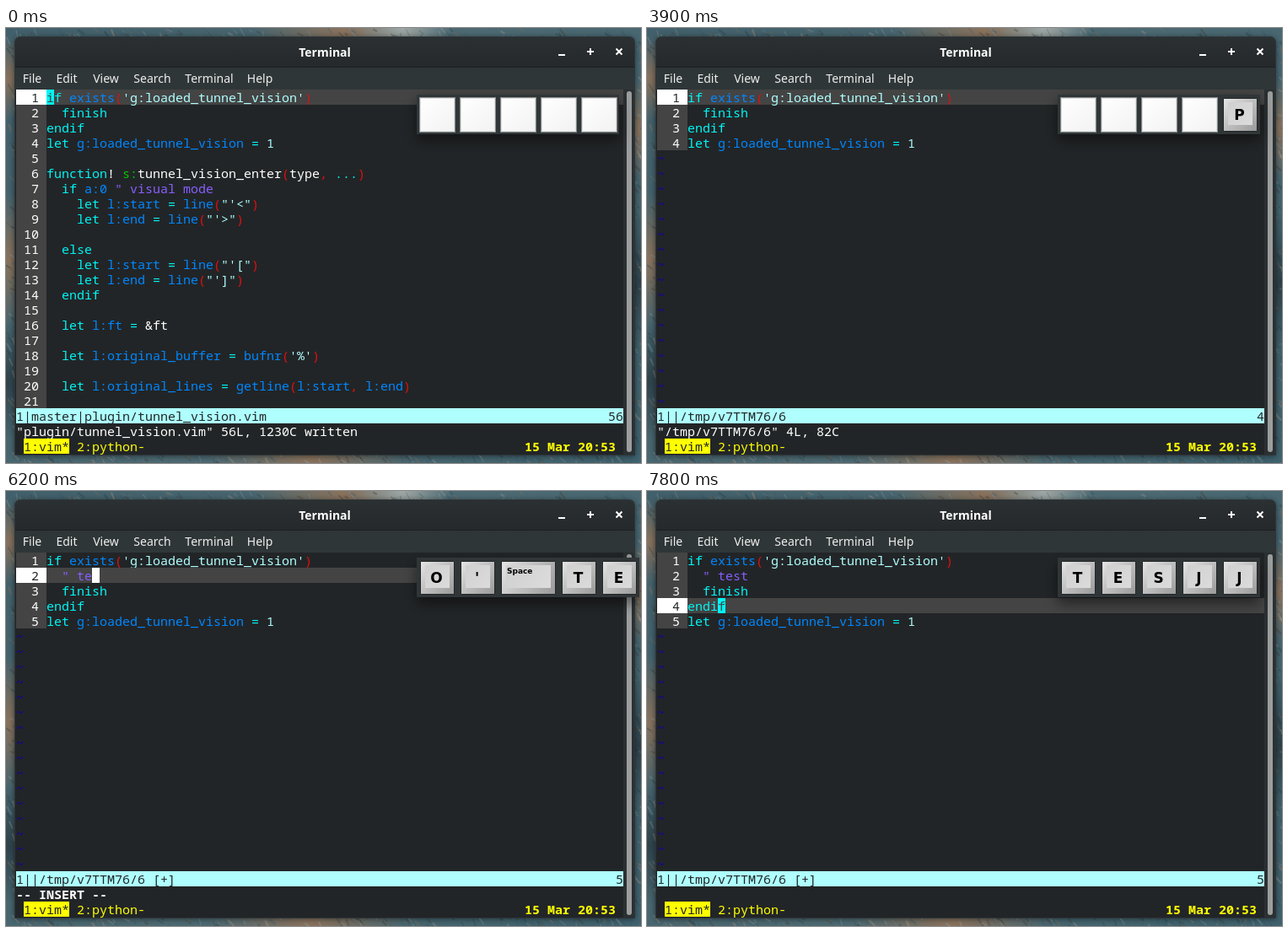
An HTML page with a canvas for the animation above (8 s loop, 753 by 516 pixels).

```html
<!DOCTYPE html>
<html lang="en">
<head>
<meta charset="utf-8">
<title>Terminal</title>
<style>
html, body { margin: 0; width: 100%; height: 100%; overflow: hidden; background: #3b4a50; }
canvas { display: block; }
</style>
</head>
<body>
<canvas id="stage" width="753" height="516"></canvas>
<script>
const canvas = document.getElementById('stage');
const LOOP = 8000, W = 753, H = 516;
const LEFT = 12, TOP = 73, CELL = 9, ROW = 18, RIGHT = 732, BASELINE = 15;
const MONO = '15px "Noto Sans Mono", monospace';
const COLOR = {
  bg: '#222527', line: '#444444', gutter: '#444444', status: '#afffff',
  c: '#00f5f5', b: '#0087ff', r: '#e01010', s: '#afffff', w: '#ffffff',
  g: '#00c800', p: '#875fff', y: '#ffff00', k: '#222527', t: '#1200a8'
};

// Tags such as {c} set the colour of the text after them.
const HEAD = [
  "{c}if {b}exists{r}({s}'g:loaded_tunnel_vision'{r})",
  '{c}  finish',
  '{c}endif',
  '{c}let {b}g:loaded_tunnel_vision {c}= {s}1'
];
const assignLine = (name, mark) => `{c}    let {b}l:${name} {c}= {b}line{r}({s}"'${mark}"{r})`;
const FULL = [
  ...HEAD,
  '',
  '{c}function{w}! {g}s:{w}tunnel_vision_enter{r}({w}type{r}, {c}...{r})',
  '{c}  if {b}a:0 {p}" visual mode',
  assignLine('start', '<'),
  assignLine('end', '>'),
  '',
  '{c}  else',
  assignLine('start', '['),
  assignLine('end', ']'),
  '{c}  endif',
  '',
  '{c}  let {b}l:ft {c}= {w}&ft',
  '',
  "{c}  let {b}l:original_buffer {c}= {b}bufnr{r}({s}'%'{r})",
  '',
  '{c}  let {b}l:original_lines {c}= {b}getline{r}({b}l:start{r}, {b}l:end{r})',
  ''
];
const withComment = text => [HEAD[0], '{p}  ' + text, ...HEAD.slice(1)];
const typed = text => ({ lines: withComment(text), row: 1, col: text.length + 2 });

const START = {
  lines: FULL, row: 0, col: 0, cursor: true, keys: [], pending: '', trail: false,
  status: '1|master|plugin/tunnel_vision.vim', count: '56',
  message: '"plugin/tunnel_vision.vim" 56L, 1230C written', insert: false
};
const TIMELINE = [
  [300, { cursor: false }],
  [900, { cursor: true }],
  [1800, { keys: ['G'] }],
  [2000, { pending: 'g' }],
  [2200, { keys: ['G', '2'] }],
  [2500, { pending: 'g@' }],
  [2700, { keys: ['G', ''] }],
  [2900, { keys: ['G', 'I'] }],
  [3100, { keys: ['', 'I'], pending: 'g@i' }],
  [3300, { keys: ['I', 'P'] }],
  [3400, { lines: HEAD, pending: '', status: '1||/tmp/v7TTM76/6', count: '4',
           message: '"/tmp/v7TTM76/6" 4L, 82C' }],
  [3900, { cursor: false, keys: ['', 'P'] }],
  [4000, { keys: [] }],
  [4500, { cursor: true }],
  [4900, { keys: ['O'] }],
  [5100, { ...typed(''), status: '1||/tmp/v7TTM76/6 [+]', count: '5',
           message: '-- INSERT --', insert: true }],
  [5200, { keys: ['O', "'"] }],
  [5300, typed('"')],
  [5600, { ...typed('" '), trail: true, keys: ['O', "'", 'Space'] }],
  [5800, { ...typed('" t'), trail: false, keys: ['O', "'", 'Space', 'T'] }],
  [6100, { keys: ['O', "'", 'Space', 'T', 'E'] }],
  [6200, typed('" te')],
  [6400, { keys: ["'", 'Space', 'T', 'E', 'S'] }],
  [6500, { ...typed('" tes'), keys: ['Space', 'T', 'E', 'S', 'T'] }],
  [6600, { ...typed('" test'), keys: ['T', 'E', 'S', 'T', 'Esc'] }],
  [7000, { col: 7, message: '', insert: false }],
  [7200, { keys: ['T', 'E', 'S', 'T', 'J'] }],
  [7300, { row: 2 }],
  [7400, { keys: ['T', 'E', 'S', '', 'J'] }],
  [7600, { keys: ['T', 'E', 'S', 'J', 'J'] }],
  [7800, { row: 3, col: 4 }]
];

function stateAt(time) {
  const state = { ...START };
  for (const [at, change] of TIMELINE) if (at <= time) Object.assign(state, change);
  return state;
}

let ctx = canvas.getContext('2d');

function rect(x, y, w, h, fill) {
  ctx.fillStyle = fill;
  ctx.fillRect(x, y, w, h);
}

function roundRect(x, y, w, h, radius, fill) {
  ctx.fillStyle = fill;
  ctx.beginPath();
  ctx.roundRect(x, y, w, h, radius);
  ctx.fill();
}

function gradient(x0, y0, x1, y1, ...colors) {
  const g = ctx.createLinearGradient(x0, y0, x1, y1);
  colors.forEach((color, i) => g.addColorStop(i / (colors.length - 1), color));
  return g;
}

function label(text, x, y, font, color, align = 'left') {
  ctx.font = font;
  ctx.fillStyle = color;
  ctx.textAlign = align;
  ctx.fillText(text, x, y);
}

const cellX = col => LEFT + col * CELL;
const rowY = row => TOP + row * ROW;

function term(text, col, row, color, bold = false) {
  label(text, cellX(col), rowY(row) + BASELINE, (bold ? 'bold ' : '') + MONO, color);
}

// Consecutive pairs of points become separate segments.
function stroke(color, width, ...points) {
  ctx.strokeStyle = color;
  ctx.lineWidth = width;
  ctx.beginPath();
  points.forEach(([x, y], i) => i % 2 ? ctx.lineTo(x, y) : ctx.moveTo(x, y));
  ctx.stroke();
}

function glow(x, y, radius, rgb) {
  const g = ctx.createRadialGradient(x, y, 0, x, y, radius);
  g.addColorStop(0, `rgba(${rgb},.85)`);
  g.addColorStop(1, `rgba(${rgb},0)`);
  rect(x - radius, y - radius, 2 * radius, 2 * radius, g);
}

function drawWallpaper() {
  rect(0, 0, W, H, gradient(0, 0, W, H, '#41606b', '#4d6a73', '#3f626e'));
  const tan = '150,116,88', pale = '168,178,176', dark = '42,60,68';
  glow(400, 0, 110, tan);
  glow(470, 0, 60, pale);
  glow(0, 275, 80, tan);
  glow(0, 60, 50, tan);
  glow(0, 420, 70, dark);
  glow(360, H, 120, tan);
  glow(W, 300, 80, dark);
  glow(W, 120, 60, tan);

  let seed = 11;
  const random = () => (seed = (seed * 16807) % 2147483647) / 2147483647;
  const tones = ['#86a0a8', '#22343c', '#8f6f56', '#33596a', '#b3a596', '#43352e'];
  ctx.globalAlpha = 0.3;
  for (let i = 0; i < 5000; i++) {
    const x = random() * W, y = random() * H;
    stroke(tones[Math.floor(random() * tones.length)], 0.6 + random() * 2,
      [x, y], [x + 2 + random() * 6, y + 2 + random() * 8]);
  }
  ctx.globalAlpha = 1;
}

function drawWindow() {
  ctx.save();
  ctx.shadowColor = 'rgba(0,0,0,.5)';
  ctx.shadowBlur = 7;
  ctx.shadowOffsetY = 1;
  roundRect(10, 10, 736, 497, [7, 7, 0, 0], '#2e3538');
  ctx.restore();

  roundRect(11, 11, 734, 35, [6, 6, 0, 0], gradient(0, 10, 0, 46, '#2b3032', '#25292b'));
  rect(11, 46, 734, 1, '#1c2022');
  rect(11, 47, 734, 26, '#2f3638');
  rect(11, 73, 721, 433, COLOR.bg);
  rect(732, 73, 13, 433, '#2b3032');
  roundRect(736, 75, 6, 428, 3, '#9c9e9e');

  label('Terminal', 378, 34, 'bold 14px "Noto Sans", sans-serif', '#ffffff', 'center');
  [['File', 31], ['Edit', 72], ['View', 118.5], ['Search', 173.5], ['Terminal', 241], ['Help', 301]]
    .forEach(([name, x]) => label(name, x, 65, '14px "Noto Sans", sans-serif', '#eeeeec', 'center'));
  stroke('#ffffff', 2, [655, 32], [663, 32]);
  stroke('#ffffff', 2, [689, 28], [697, 28], [693, 24], [693, 32]);
  stroke('#ffffff', 2, [723.5, 24.5], [730.5, 31.5], [730.5, 24.5], [723.5, 31.5]);
}

function drawCode(markup, row) {
  let col = 4, color = 'w';
  markup.split(/\{(\w)\}/).forEach((part, i) => {
    if (i % 2) { color = part; return; }
    term(part, col, row, COLOR[color]);
    col += part.length;
  });
}

function drawCursor({ lines, row, col, insert }) {
  const source = lines[row];
  const char = source.replace(/\{\w\}/g, '')[col] || '';
  const tone = insert ? 'w' : source[1];
  rect(cellX(col + 4), rowY(row), CELL, ROW, COLOR[tone]);
  term(char, col + 4, row, COLOR.line);
}

function drawTerminal(state) {
  const { lines, row } = state;
  for (let i = 0; i < 21; i++) {
    if (i >= lines.length) {
      term('~', 0, i, COLOR.t);
      continue;
    }
    const current = i === row;
    rect(LEFT, rowY(i), 4 * CELL, ROW, current ? '#ffffff' : COLOR.gutter);
    if (current) rect(cellX(4), rowY(i), RIGHT - cellX(4), ROW, COLOR.line);
    term(String(i + 1).padStart(3), 0, i, current ? COLOR.k : COLOR.w);
    drawCode(lines[i], i);
  }
  if (state.trail) rect(cellX(7), rowY(1) + 16, CELL, 1, COLOR.p);
  if (state.cursor) drawCursor(state);

  rect(LEFT, rowY(21), RIGHT - LEFT, ROW, COLOR.status);
  term(state.status, 0, 21, COLOR.k);
  term(state.count, 80 - state.count.length, 21, COLOR.k);
  term(state.message, 0, 22, COLOR.w, state.insert);
  term(state.pending, 69, 22, COLOR.w);
  rect(cellX(1), rowY(23), 6 * CELL, ROW, COLOR.y);
  term('1:vim*', 1, 23, COLOR.k);
  term('2:python-', 8, 23, COLOR.y);
  term('15 Mar 20:53', 67, 23, COLOR.y, true);
}

function drawKey(name, x) {
  const y = 83, w = name === 'Space' ? 65 : 41, h = 40;
  if (!name) {
    rect(x - 1, y - 1, w + 2, h + 2, '#868a8b');
    rect(x, y, w, h, '#dedede');
    rect(x + 1, y + 1, w - 2, h - 2, gradient(x, y, x + w, y + h, '#ffffff', '#f2f2f2'));
    return;
  }
  roundRect(x, y, w, h, 2, '#242626');
  rect(x + 1, y + 1, w - 2, h - 2, gradient(x, y, x + w, y + h, '#e6e6e6', '#bebebe', '#989898'));
  rect(x + 6, y + 5, w - 12, h - 13, gradient(x, y, x + w, y + h, '#cecece', '#dedede'));
  const font = size => `bold ${size}px "DejaVu Sans", sans-serif`;
  if (name === 'Space') label(name, x + 7, y + 15, font(9), '#000000');
  else if (name === 'Esc') label(name, x + 19.5, y + 23, font(10), '#000000', 'center');
  else label(name, x + 19.5, y + 26, font(17), '#000000', 'center');
}

function drawKeys(keys) {
  const slots = [...Array(5 - keys.length).fill(''), ...keys];
  ctx.save();
  ctx.shadowColor = 'rgba(0,0,0,.5)';
  ctx.shadowBlur = 16;
  ctx.shadowOffsetY = 7;
  rect(487, 79, slots.includes('Space') ? 264 : 240, 47, '#303638');
  ctx.restore();
  let x = 491;
  for (const name of slots) {
    drawKey(name, x);
    x += name === 'Space' ? 72 : 48;
  }
}

const stageCtx = ctx;
const backdrop = document.createElement('canvas');
backdrop.width = W;
backdrop.height = H;
ctx = backdrop.getContext('2d');
drawWallpaper();
drawWindow();
ctx = stageCtx;

const begin = performance.now();
function frame() {
  const state = stateAt((performance.now() - begin) % LOOP);
  ctx.drawImage(backdrop, 0, 0);
  drawTerminal(state);
  drawKeys(state.keys);
  requestAnimationFrame(frame);
}
frame();
</script>
</body>
</html>
```
